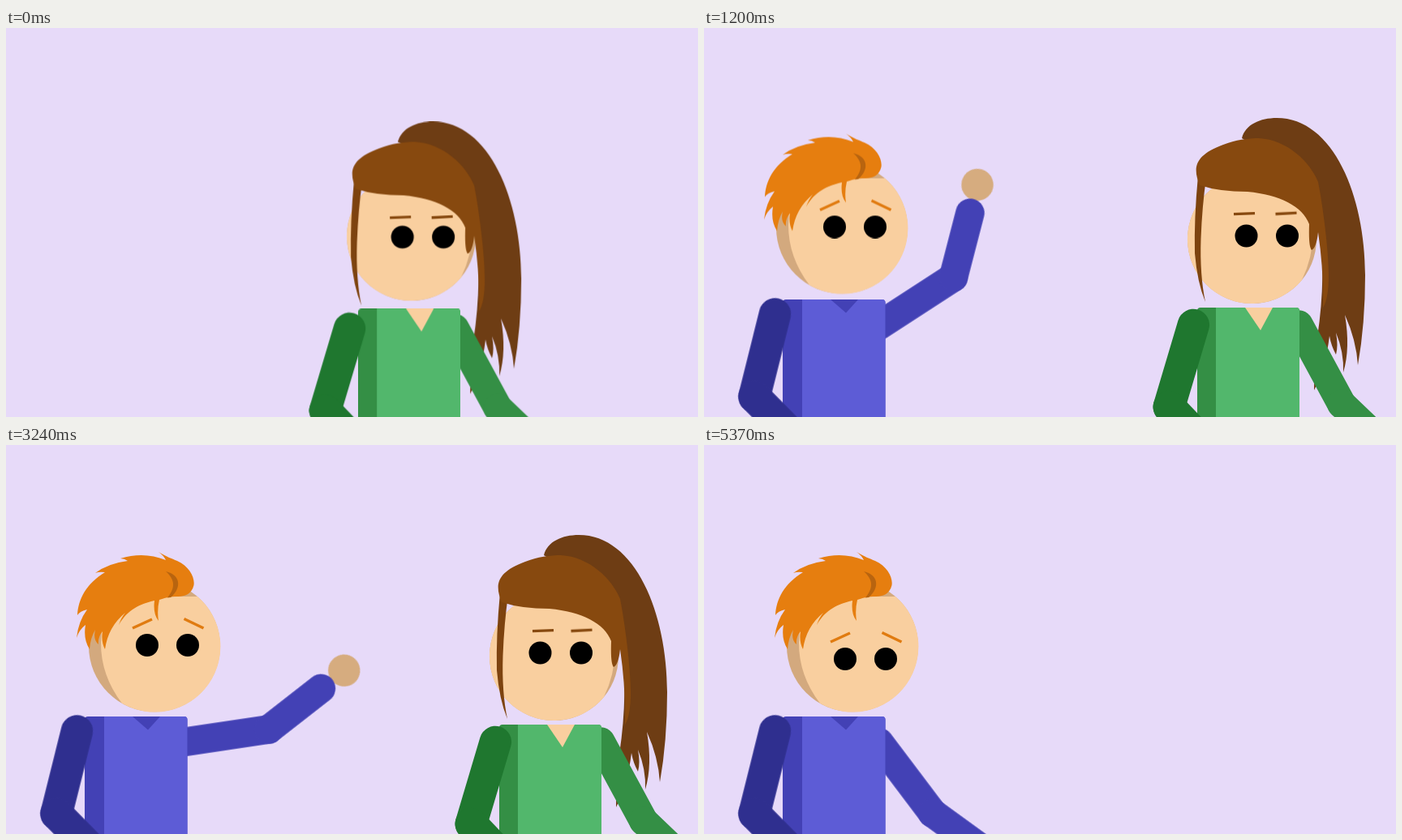
An HTML page that plays this animation: 853x480 px, repeating every 5.4 s.

```html
<!DOCTYPE html>
<html lang="en">
<head>
<meta charset="utf-8">
<title>Conversation</title>
<style>
html, body { margin: 0; width: 100%; height: 100%; overflow: hidden; background: #e7daf9; }
svg { display: block; width: 853px; height: 480px; }
line { stroke-linecap: round; }
.limb line { stroke-width: 35.5; }
.near line { stroke-width: 39.5; }
.brow { stroke-width: 3.4; stroke-linecap: butt; }

g[class] {
  animation-duration: 5.4s;
  animation-timing-function: ease-in-out;
  animation-iteration-count: infinite;
}

/* Woman */
.w-walk { animation-name: w-walk; }
.w-bob { animation-name: w-bob; }
.w-trail { animation-name: w-trail; }
.w-face { animation-name: w-face; }
.w-eyes { animation-name: w-eyes; }
.w-brow-l { animation-name: w-brow-l; }
.w-brow-r { animation-name: w-brow-r; }
@keyframes w-walk {
  0% { transform: translateX(-174px); animation-timing-function: linear; }
  16.11% { transform: translateX(-38px); animation-timing-function: ease-out; }
  22.2%, 61.1% { transform: none; }
  70%, 100% { transform: translateX(304px); }
}
@keyframes w-bob {
  0% { transform: translateY(1.5px); }
  5.37% { transform: translateY(-17px); }
  10.74% { transform: translateY(0); }
  16.11% { transform: translateY(-19.5px); }
  21.48%, 100% { transform: translateY(0); }
}
@keyframes w-trail {
  0% { transform: translate(-6px, 3px); animation-timing-function: linear; }
  16.11% { transform: translate(-1px, 0); }
  22.2%, 100% { transform: none; }
}
@keyframes w-face {
  0% { transform: translate(4px, -8px); }
  7%, 100% { transform: none; }
}
@keyframes w-eyes {
  0% { transform: translate(10px, -3px); }
  7%, 23% { transform: translate(10px, 0); }
  29%, 52% { transform: translate(-24px, 0); }
  57%, 100% { transform: none; }
}
@keyframes w-brow-l {
  0%, 23% { transform: translate(4px, 0); }
  29%, 35% { transform: translate(-29px, -5px) rotate(-2deg); }
  42%, 50% { transform: translate(-29px, -12px) rotate(-2deg); }
  57%, 100% { transform: none; }
}
@keyframes w-brow-r {
  0%, 23% { transform: translateX(8px); }
  29%, 52% { transform: translateX(-25px); }
  57%, 100% { transform: none; }
}

/* Man */
.m-walk { animation-name: m-walk; }
.m-head { animation-name: m-head; }
.m-eyes { animation-name: m-eyes; }
.m-upper { animation-name: m-upper; }
.m-fore { animation-name: m-fore; }
.m-near { animation-name: m-near; }
@keyframes m-walk {
  0%, 5% { transform: translateX(-448px); }
  22.2%, 100% { transform: none; }
}
@keyframes m-head {
  0%, 37% { transform: translate(-13px, -1.5px); }
  45.2%, 50.9% { transform: translate(0, -3.5px); }
  58.3%, 100% { transform: none; }
}
@keyframes m-eyes {
  0%, 72.8% { transform: none; }
  82.8%, 100% { transform: translateY(17px); }
}
@keyframes m-upper {
  0%, 50.9% { transform: rotate(-33deg); }
  58.3%, 61.3% { transform: rotate(-8.5deg); }
  66.7%, 100% { transform: rotate(53deg); }
}
@keyframes m-fore {
  0%, 37% { transform: rotate(-42.5deg); }
  45.2%, 50.9% { transform: rotate(-62.7deg); }
  58.3%, 61.3% { transform: rotate(-29.5deg); }
  66.7%, 100% { transform: rotate(-17deg); }
}
@keyframes m-near {
  0%, 22.2% { transform: rotate(104deg); }
  30.6%, 37% { transform: rotate(42.6deg); }
  45.2%, 100% { transform: rotate(104deg); }
}
</style>
</head>
<body>
<svg viewBox="0 0 853 480">
  <rect width="853" height="480" fill="#e7daf9"/>

  <g class="w-walk"><g class="w-bob">
    <g class="w-trail">
      <path fill="#6e3d14" d="M663 136C667 119 686 111 706 111C776 111 815 208 815 305Q815 365 806 416Q804 385 790 354Q797 395 788 425Q789 400 779 376Q782 392 779 403Q773 392 771 380Q766 420 752 447Q752 425 753 400C762 350 765 300 760 250L740 180Z"/>
      <g class="limb" stroke="#348f45">
        <line x1="733" y1="366" x2="786" y2="464"/>
        <line x1="786" y1="464" x2="858" y2="533"/>
      </g>
    </g>

    <rect x="608" y="345" width="126" height="180" rx="4" fill="#348f45"/>
    <path fill="#52b76c" d="M631 345H730Q734 345 734 349V526H631Z"/>
    <path fill="#f9cf9f" d="M667 345H701L686 373Z"/>

    <g class="w-trail">
      <g class="near" stroke="#1f772f">
        <line x1="603.3" y1="366.5" x2="573.3" y2="467.5"/>
        <line x1="573.3" y1="467.5" x2="633" y2="530"/>
      </g>
      <g class="w-face">
        <circle cx="675.5" cy="260.5" r="79.5" fill="#d3a97e"/>
        <path fill="#f9cf9f" d="M737 310.9A79.5 79.5 0 1 1 747 226Q757 270 737 310.9Z"/>
      </g>
      <path fill="#7d430f" d="M609 182Q604 235 605 278Q608 314 618 338Q611 305 612.5 260Q614 220 619 185Z"/>
      <path fill="#87490f" d="M611 194C602 172 605 157 640 144C655 138 671 136 684 136C719 138 747 165 757 190C763 220 770 275 770 305Q770 334 763 345Q764 300 757 252Q755 271 749 274Q745 270 746 242C738 220 710 206 670 202Q635 202 611 194Z"/>
      <g class="w-eyes">
        <circle cx="658.5" cy="256.5" r="14"/>
        <circle cx="709" cy="256.5" r="14"/>
      </g>
      <g stroke="#87490f">
        <g transform="translate(662 229)"><g class="w-brow-l"><line class="brow" x1="-13" y1=".6" x2="13" y2="-.4"/></g></g>
        <g transform="translate(709.5 228.7)"><g class="w-brow-r"><line class="brow" x1="-13" y1=".7" x2="13" y2="-.6"/></g></g>
      </g>
    </g>
  </g></g>

  <g class="m-walk">
    <g transform="translate(216 367)">
      <g class="m-upper limb" stroke="#4341b5">
        <line x1="0" y1="0" x2="109" y2="0"/>
        <g transform="translate(109 0)"><g class="m-fore">
          <circle cx="118" r="19.7" fill="#d6ac7f" stroke="none"/>
          <line x1="0" y1="0" x2="82" y2="0"/>
        </g></g>
      </g>
    </g>

    <rect x="97" y="335" width="126.5" height="190" rx="4" fill="#4341b5"/>
    <path fill="#5d5cd6" d="M121 335H219.5Q223.5 335 223.5 339V525H121Z"/>
    <path fill="#4341b5" d="M156 335H190L175 351.5Z"/>

    <g transform="translate(87.5 353)">
      <g class="m-near near" stroke="#2f2f8f">
        <line x1="0" y1="0" x2="105" y2="0"/>
        <g transform="translate(105 0) rotate(-58.6)">
          <circle cx="156" r="17" fill="#d6ac7f" stroke="none"/>
          <line x1="0" y1="0" x2="119" y2="0"/>
        </g>
      </g>
    </g>

    <g class="m-head">
      <circle cx="183" cy="248.3" r="81" fill="#d3a97e"/>
      <path fill="#f9cf9f" d="M143 318.8A81 81 0 0 0 236 187L212 187L128 190Q100 262 143 318.8Z"/>
      <path fill="#e67e0f" d="M188 132C198 138 204 140 211 143C226 150 233 163 231.5 173C229 184 220 187 212 187C200 187 196 189 189 191Q186 204 188 217Q181 209 183 192C165 196 150 203 139 222Q142 213 147 207Q126 224 122 252Q117 243 119 230Q113 237 114 246Q107 240 110 228Q104 238 103 252Q95 240 98 222Q90 228 87 238Q89 218 100 203Q91 205 88 210C89 190 99 171 122 157Q115 156 110 158Q126 146 150 143Q146 140 141 140Q170 131 197 142Q194 136 188 132Z"/>
      <path fill="#b8640f" d="M197 156C215 160 217 176 203 188L199 188.5C211 174 206 164 197 156Z"/>
      <g class="m-eyes">
        <circle cx="174" cy="247" r="14"/>
        <circle cx="224" cy="247" r="14"/>
        <g stroke="#e07b10">
          <line class="brow" x1="156" y1="226" x2="180" y2="215"/>
          <line class="brow" x1="219.5" y1="214.5" x2="243.5" y2="226"/>
        </g>
      </g>
    </g>
  </g>
</svg>
</body>
</html>
```
